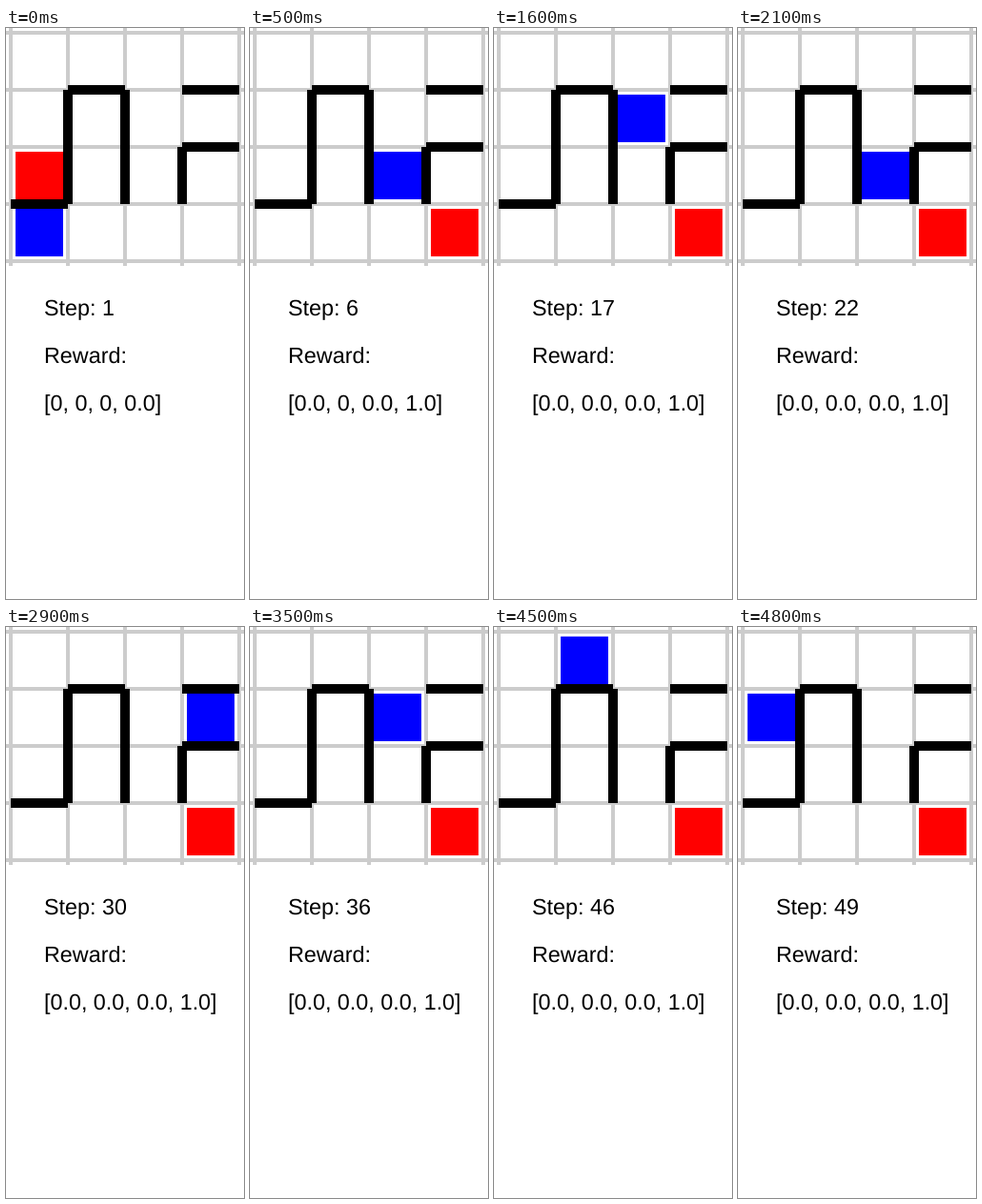
These frames come from a looping animation (250 px wide and 600 px high, 4.9 s). An HTML page with a canvas:

```html
<!DOCTYPE html>
<html lang="en">
<head>
<meta charset="utf-8">
<title>Maze walk</title>
<style>
  html, body { margin: 0; width: 100%; height: 100%; overflow: hidden; background: #fff; }
  canvas { display: block; }
</style>
</head>
<body>
<canvas id="stage" width="250" height="600"></canvas>
<script>
const ctx = document.getElementById('stage').getContext('2d');
const STEP_MS = 100, CELL = 60, EDGE = 5;

// One letter per step; a dot is a step spent in place.
const MOVES = 'RR..U.UUD.U.' + 'D....UD.DU..' + '..R...LU.D.U' + 'D.R...LULLD.';
const DIRS = { R: [1, 0], L: [-1, 0], U: [0, -1], D: [0, 1], '.': [0, 0] };
const path = [[0, 3]];
for (const m of MOVES) {
  const [c, r] = path[path.length - 1], [dc, dr] = DIRS[m];
  path.push([c + dc, r + dr]);
}

// Grid corners: from column, row to column, row.
const WALLS = [
  [1, 1, 2, 1], [3, 1, 4, 1], [3, 2, 4, 2], [0, 3, 1, 3],
  [1, 1, 1, 3], [2, 1, 2, 3], [3, 2, 3, 3]
];

// Each reward text holds from its step onwards.
const REWARDS = [
  [1, '[0, 0, 0, 0.0]'],
  [4, '[0, 0, 0, 1.0]'],
  [5, '[0, 0, 0.0, 1.0]'],
  [6, '[0.0, 0, 0.0, 1.0]'],
  [10, '[0.0, 0.0, 0.0, 1.0]']
];

const at = n => EDGE + n * CELL;

function line(x1, y1, x2, y2) {
  ctx.beginPath();
  ctx.moveTo(x1, y1);
  ctx.lineTo(x2, y2);
  ctx.stroke();
}

function square([c, r], color) {
  ctx.fillStyle = color;
  ctx.fillRect(at(c) + 5, at(r) + 5, 50, 50);
}

function draw(step) {
  ctx.fillStyle = '#fff';
  ctx.fillRect(0, 0, 250, 600);

  ctx.strokeStyle = '#ccc';
  ctx.lineWidth = 4;
  for (let i = 0; i <= 4; i++) {
    line(at(i), 0, at(i), 250);
    line(0, at(i), 250, at(i));
  }

  square(step === 1 ? [0, 2] : [3, 3], '#f00');
  square(path[step - 1], '#00f');

  ctx.strokeStyle = '#000';
  ctx.lineWidth = 10;
  for (const w of WALLS) line(...w.map(at));

  ctx.fillStyle = '#000';
  ctx.font = '23.33px "Liberation Sans", Arial, sans-serif';
  ctx.textRendering = 'geometricPrecision';
  const reward = REWARDS.filter(([from]) => from <= step).pop()[1];
  ['Step: ' + step, 'Reward:', reward].forEach((text, i) => ctx.fillText(text, 40, 302 + i * 50));
}

const start = performance.now();
function tick() {
  const elapsed = performance.now() - start;
  draw(Math.floor(elapsed / STEP_MS) % path.length + 1);
  requestAnimationFrame(tick);
}
tick();
</script>
</body>
</html>
```
